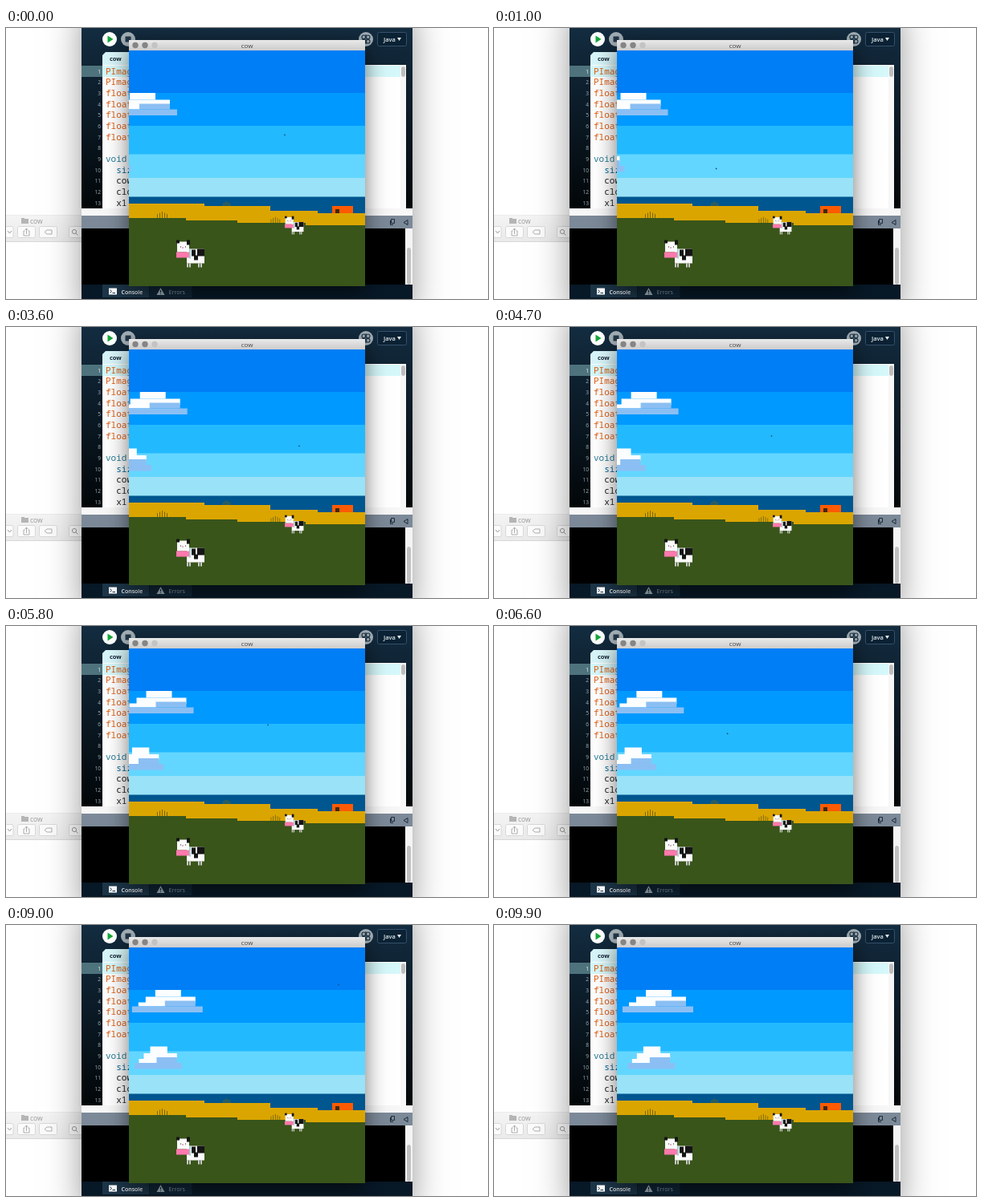
Animation, 600 px wide and 338 px high, one loop 10000 ms. Source, as an HTML page with a canvas:

```html
<!DOCTYPE html>
<html>
<head>
<meta charset="utf-8">
<style>
html, body { margin: 0; width: 600px; height: 338px; overflow: hidden; background: #fff; }
canvas { display: block; }
</style>
</head>
<body>
<canvas id="stage" width="600" height="338"></canvas>
<script>
const c = document.getElementById('stage').getContext('2d');
const SANS = '"Open Sans", "Noto Sans", sans-serif';
const MONO = '"Noto Sans Mono", "DejaVu Sans Mono", monospace';

function rect(color, x, y, w, h) {
  c.fillStyle = color;
  c.fillRect(x, y, w, h);
}
function disc(color, x, y, r) {
  c.fillStyle = color;
  c.beginPath();
  c.arc(x, y, r, 0, 7);
  c.fill();
}
function ring(color, x, y, r) {
  c.strokeStyle = color;
  c.beginPath();
  c.arc(x, y, r, 0, 7);
  c.stroke();
}
function shape(path, fill, stroke, width = 1) {
  const p = new Path2D(path);
  c.lineWidth = width;
  if (fill) { c.fillStyle = fill; c.fill(p); }
  if (stroke) { c.strokeStyle = stroke; c.stroke(p); }
}
function box(fill, edge, x, y, w, h, r = 2) {
  c.beginPath();
  c.roundRect(x, y, w, h, r);
  c.fillStyle = fill;
  c.fill();
  c.strokeStyle = edge;
  c.lineWidth = 1;
  c.stroke();
}
function text(s, x, y, color, font, align = 'left') {
  c.fillStyle = color;
  c.font = font;
  c.textAlign = align;
  c.fillText(s, x, y);
}
function fade(y0, y1, from, to) {
  const g = c.createLinearGradient(0, y0, 0, y1);
  g.addColorStop(0, from);
  g.addColorStop(1, to);
  return g;
}
function shadowed(x, y, w, h, alpha, blur, drop) {
  c.save();
  c.shadowColor = `rgba(0,0,0,${alpha})`;
  c.shadowBlur = blur;
  c.shadowOffsetY = drop;
  rect('#0b1f2f', x, y, w, h);
  c.restore();
}

function finder() {
  const ink = '#9a9a9a';
  rect('#dadada', 0, 233.5, 94, 1);
  rect(fade(234, 267, '#f4f4f4', '#eaeaea'), 0, 234, 94, 33);
  rect('#d8d8d8', 0, 266, 94, 1);
  rect('#b5b5b5', 19, 237, 4, 2);
  rect('#b5b5b5', 19, 238, 9, 6);
  text('cow', 30, 243.5, ink, '8.5px ' + SANS);
  box('#fbfbfb', '#d8d8d8', -8, 247.5, 17, 14);
  for (const x of [14.5, 41.5, 78.5]) box('#fbfbfb', '#d8d8d8', x, 247.5, 22, 14);
  shape('M2 253l2.5 3 2.5-3', null, ink);
  shape('M23.5 253H22v6h7v-6h-1.5M25.5 257v-7l-1.8 2m1.8-2l1.8 2', null, ink, .8);
  shape('M48 254.5l3-2.5h6v5h-6z', null, ink, .8);
  shape('M87 256l2.5 2.5', null, ink);
  ring(ink, 85, 254, 2.6);
}

function toolbar() {
  disc('#fff', 129, 14, 9);
  shape('M126.5 9.5l7 4.5-7 4.5z', '#13a638');
  disc('#a5b0b7', 152, 14, 9);
  rect('#223748', 148.5, 10.5, 7, 7);
  disc('#a5b0b7', 448, 14, 9);
  c.lineWidth = 1.2;
  for (const dx of [-2.7, 2.7])
    for (const dy of [-2.7, 2.7]) ring('#20384a', 448 + dx, 14 + dy, 2.3);
  shape('M448 8v12', null, '#20384a', 1.2);
  box('#0b2234', '#34506a', 462.5, 5.5, 36, 17);
  text('Java', 470, 16.5, '#e5edf2', '600 7.5px ' + SANS);
  shape('M487 12h5l-2.5 4z', '#e5edf2');
}

function editor() {
  shape('M120 46V34l4-4h36v16z', '#d8f6fa');
  text('cow', 129, 41, '#102030', 'bold 7.5px ' + SANS);
  rect('#fff', 120, 46, 378, 180);
  rect('#d5f8fb', 120, 47, 371, 14);
  rect('#4e737d', 94, 47, 26, 14);
  rect('#f7f7f7', 491, 46, 7, 180);
  rect('#f7f7f7', 94, 225, 412, 9);
  box('#bdbdbd', '#bdbdbd', 492.5, 48.5, 4, 12);
  const code = ['PImage', 'PImage', 'float', 'float', 'float', 'float', 'float', '',
    'void', '  size', '  cow', '  clo', '  x1'];
  code.forEach((s, i) => {
    const y = 53.7 + i * 13.65;
    const color = i < 7 ? '#dd5c12' : i < 9 ? '#277a96' : i < 10 ? '#006699' : '#222';
    text(i + 1, 118, y + 3, i ? '#9db2bd' : '#fff', '6.5px ' + SANS, 'right');
    text(s, 124, y + 4, color, '11px ' + MONO);
  });
}

function consolePane() {
  rect('#7c8998', 94, 234, 412, 16);
  shape('M478.5 240v5.5h3.5M479.5 238.5h4v5h-4z', null, '#1a2c3a');
  shape('M500 239.5l-5 3 5 3z', null, '#1a2c3a');
  rect('#000', 94, 250, 403, 70);
  rect('#f4f4f4', 497, 250, 9, 70);
  box('#c1c1c1', '#c1c1c1', 499.5, 274.5, 4, 45);
  rect('#071826', 94, 320, 412, 18);
  rect('#1c3548', 120, 320, 58, 16);
  rect('#102637', 178.5, 320, 53, 16);
  rect('#fff', 128, 324.5, 10, 8);
  shape('M129.5 326.5l2 2-2 2M132.5 330.5h3.5', null, '#173044');
  text('Console', 143.5, 331.5, '#fff', '600 7px ' + SANS);
  shape('M192.5 324l5 9h-10z', '#9fb0ba');
  shape('M192.5 327v3m0 1v1', null, '#102637');
  text('Errors', 202.5, 331.5, '#8fa2ae', '7.2px ' + SANS);
}

function sketchWindow() {
  shadowed(153, 15, 294, 307, .55, 26, 8);
  rect(fade(15, 28, '#e9e9e9', '#cccccc'), 153, 15, 294, 13);
  for (let i = 0; i < 3; i++) disc(i < 2 ? '#858585' : '#c3c3c3', 161 + i * 12, 21.5, 3.7);
  text('cow', 300, 24.5, '#444', '8px ' + SANS, 'center');
}

function placed(x, y, s, paint) {
  c.save();
  c.translate(x, y);
  c.scale(s, s);
  paint();
  c.restore();
}

function cow() {
  const black = '#151515', white = '#fafafa';
  for (const x of [13, 16, 27, 30]) rect('#c9c9c9', x, 30, 2, 5);
  rect(white, 13, 12, 22, 18);
  rect(black, 26, 12, 9, 9);
  rect(black, 19, 13, 5, 8);
  rect(black, 22, 20, 5, 6);
  rect('#9fd0cf', 16, 12, 2, 12);
  rect(white, 1, 3, 15, 13);
  rect(black, 0, 1, 4, 4);
  rect(black, 13, 1, 4, 6);
  rect(black, 5, 9, 1, 1);
  rect(black, 11, 9, 1, 1);
  rect('#cf6b8c', 7, 10, 2, 1);
  rect('#ff78ac', 0, 16, 16, 7);
}

function grass() {
  for (let i = 0; i < 5; i++) rect('#79690c', i * 3, 0, 1, Math.abs(i - 2) * 1.5 - 8);
}

// Each [left, top] step reaches to the start of the next one.
function steps(color, list) {
  list.forEach(([x, y], i) => {
    const right = list[i + 1] ? list[i + 1][0] : 447;
    rect(color, x, y, right - x, 322 - y);
  });
}

function land() {
  const sky = { '#007ef6': 28, '#0099ff': 81, '#23b9ff': 122, '#63d6ff': 157.5,
    '#9ae2f7': 187, '#00568f': 210.5 };
  for (const color in sky) rect(color, 153, sky[color], 294, 322 - sky[color]);
  steps('#dba500', [[153, 219], [247, 222], [329, 228], [388, 231]]);
  steps('#39551a', [153, 224, 288, 373].map((x, i) => [x, 237 + 3 * i]));
  rect('#ff5a00', 406, 222, 26, 9);
  rect('#3d2a10', 410, 226, 5, 5);
  placed(188, 237, 1, grass);
  placed(270, 222, .7, grass);
  placed(329.5, 243, .9, grass);
  placed(212, 263.5, 1, cow);
  placed(347, 234, .67, cow);
}

function cloud(x, y, s) {
  const white = '#fbfdff', blue = '#8bbff3';
  const bar = (color, x0, x1, y0, y1) => rect(color, x + x0 * s, y + y0, (x1 - x0) * s, y1 - y0);
  bar(white, 29, 61, 0, 8.5);
  bar(white, 17, 79, 8.5, 16);
  bar(white, 8, 42, 15.5, 20.5);
  bar(blue, 41, 79, 13.5, 20.5);
  bar(blue, 0, 88, 20.5, 28);
}

// The fly wanders smoothly between these [seconds, x, y] points.
const flight = [[0, 347, 133], [2.1, 195, 224], [3.6, 365, 148], [5.8, 326, 123],
  [7.5, 248, 147], [9, 414, 74], [9.9, 455, 40]];

function fly(t) {
  const i = Math.max(1, flight.findIndex(p => p[0] >= t));
  const [t0, x0, y0] = flight[i - 1], [t1, x1, y1] = flight[i];
  const k = (1 - Math.cos(Math.PI * (t - t0) / (t1 - t0))) / 2;
  disc('#17507c', x0 + (x1 - x0) * k, y0 + (y1 - y0) * k + .3, .9);
}

function draw(t) {
  rect('#fff', 0, 0, 600, 338);
  finder();
  shadowed(94, -20, 412, 378, .4, 40, 0);
  rect(fade(0, 226, '#132c40', '#020608'), 94, 0, 412, 338);
  toolbar();
  editor();
  consolePane();
  sketchWindow();
  c.save();
  c.beginPath();
  c.rect(153, 28, 294, 294);
  c.clip();
  land();
  cloud(125 + 3.535 * t, 81, 1);
  cloud(96.7 + 7.05 * t, 151.5, .667);
  fly(t);
  c.restore();
}

const start = performance.now();
function tick() {
  const ms = (performance.now() - start) % 10000;
  draw(Math.floor(ms / 100) / 10);
  requestAnimationFrame(tick);
}
tick();
</script>
</body>
</html>
```
